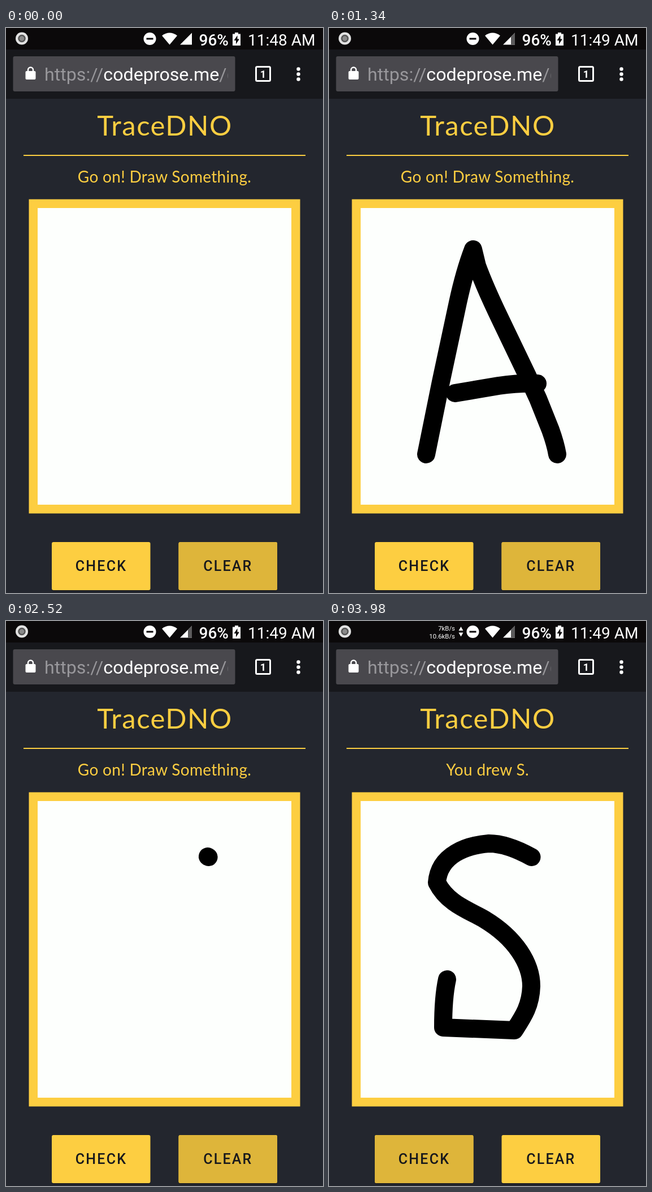
An HTML page for the animation above (4.22 s loop, 561 by 998 pixels).

```html
<!DOCTYPE html>
<html lang="en">
<head>
<meta charset="utf-8">
<title>Letter drawing demo</title>
<style>
  html, body { margin: 0; width: 100%; height: 100%; overflow: hidden; background: #23262e; }
  svg { display: block; width: 561px; height: 998px; font-family: Roboto, sans-serif; }
  .page { font-family: Lato, sans-serif; fill: #fdce41; text-anchor: middle; }
  .label { font-size: 25px; font-weight: 500; letter-spacing: 2.2px; fill: #17181c; text-anchor: middle; }
  .ink { fill: none; stroke: #000; stroke-width: 32; stroke-linecap: round; stroke-linejoin: round; stroke-dasharray: 1 2; }
  .dim { fill: #deb53a; }
</style>
</head>
<body>
<svg viewBox="0 0 561 998">
  <defs>
    <clipPath id="urlClip"><rect x="60" y="50" width="333" height="62"/></clipPath>
  </defs>

  <rect width="561" height="998" fill="#23262e"/>
  <rect width="561" height="125" fill="#17181c"/>
  <rect width="561" height="38" fill="#0b090a"/>

  <!-- Status bar -->
  <circle cx="28" cy="18.500" r="11" fill="#e2e2e2"/>
  <circle cx="28" cy="18.500" r="5.500" fill="#8a8a8a" stroke="#555" stroke-width="2.500"/>
  <g id="net" fill="#fff">
    <g font-size="11.400" text-anchor="end">
      <text id="up" x="223" y="17"/>
      <text id="down" x="223" y="31"/>
    </g>
    <path d="M229.500 17l4-7 4 7zM229.500 20.500h8l-4 7z"/>
  </g>
  <g fill="#fff">
    <circle cx="254.500" cy="19" r="11"/>
    <rect x="248.500" y="17.500" width="12" height="3" fill="#0b090a"/>
    <path d="M276 13.500Q289.500 3.500 303 13.500L289.500 29.500z"/>
    <path d="M308 29.500L329 8.500V29.500z"/>
    <path id="weak" d="M322 15.500L329 8.500V29.500H322z" fill="#5c5b5c"/>
    <path d="M401 10.500h4v-2.500h6v2.500h4v20.500h-14z"/>
    <path d="M409.500 13l-6 9h3.500v6.500l6-9h-3.500z" fill="#0b090a"/>
    <text x="341.500" y="31" font-size="28" font-weight="500">96%</text>
    <text id="clock" x="547.500" y="31" font-size="28" text-anchor="end"/>
  </g>

  <!-- Address bar -->
  <rect x="12.500" y="50" width="393" height="62" rx="3" fill="#49484d"/>
  <rect x="34.500" y="76" width="18" height="15" rx="2" fill="#fff"/>
  <path d="M39 77v-3a4.500 4.500 0 0 1 9 0v3" fill="none" stroke="#fff" stroke-width="2.500"/>
  <text x="68" y="92.500" font-size="32.200" fill="#98979b" clip-path="url(#urlClip)">https://<tspan fill="#fff">codeprose.me</tspan>/<tspan fill="#68676c">c</tspan></text>
  <rect x="442.500" y="68.500" width="25" height="25" rx="2" fill="none" stroke="#fff" stroke-width="3"/>
  <text x="455" y="87.500" font-size="18" font-weight="700" fill="#fff" text-anchor="middle">1</text>
  <path d="M517.500 72.500v0M517.500 81.500v0M517.500 90.500v0" stroke="#fff" stroke-width="6.500" stroke-linecap="round"/>

  <!-- Page -->
  <g class="page">
    <text x="281" y="190" font-size="49" letter-spacing="1.500">TraceDNO</text>
    <rect x="31" y="224" width="499" height="2"/>
    <text id="message" x="280.500" y="273" font-size="28" letter-spacing=".3"/>
    <rect x="40.500" y="302.500" width="480" height="555"/>
  </g>
  <rect x="56" y="318" width="449" height="524" fill="#fdfffd"/>
  <path class="ink" id="legs" pathLength="1" d="M172 753L198 625L228 485Q240 430 255 391L262 420Q276 458 302 512L351 614L370 655L392 710Q401 735 404 753"/>
  <path class="ink" id="bar" pathLength="1" d="M223 645L300 632Q335 627 369 628"/>
  <path class="ink" id="ess" pathLength="1" d="M358.500 417Q315 393 283 393C245 396 195 412 191 462C210 500 250 512 275 527C330 560 358 605 358 645C357 680 343 700 328 723L202 718Q202 665 209 633"/>

  <!-- Buttons -->
  <g fill="#1b1d24">
    <rect x="81" y="910" width="174.500" height="85" rx="3"/>
    <rect x="305.500" y="910" width="174.500" height="85" rx="3"/>
  </g>
  <g fill="#fdce41">
    <rect x="81" y="908" width="174.500" height="85" rx="3"/>
    <rect x="305.500" y="908" width="174.500" height="85" rx="3"/>
  </g>
  <rect class="dim" id="checkDim" x="81" y="908" width="174.500" height="85" rx="3"/>
  <rect class="dim" id="clearDim" x="305.500" y="908" width="174.500" height="85" rx="3"/>
  <text class="label" x="168.500" y="959">CHECK</text>
  <text class="label" x="392.800" y="959">CLEAR</text>
</svg>
<script>
const LOOP = 4220, CHECK_A = 1340, CLEAR = 1980, CHECK_S = 3200, FADE = 260;
const PROMPT = 'Go on! Draw Something.';
const $ = id => document.getElementById(id);
const progress = (t, from, to) => Math.min(1, Math.max(0, (t - from) / (to - from)));
const show = (el, on) => el.style.display = on ? '' : 'none';
const smooth = u => u * u * (3 - 2 * u);
const fade = (t, from) => smooth(progress(t, from, from + FADE));
const setText = (id, text) => { if ($(id).textContent !== text) $(id).textContent = text; };

// Network speeds: [from, to, up, down]
const speeds = [
  [440, 900, '2.6kB/s', '11.5kB/s'],
  [1680, 2420, '1.1kB/s', '3.2kB/s'],
  [3980, LOOP, '7kB/s', '10.6kB/s'],
];

function drawInk(id, t, from, to, until, power = 1) {
  const el = $(id);
  show(el, t >= from && t < until);
  const p = 1 - (1 - progress(t, from, to)) ** power;
  el.style.strokeDashoffset = 1 - Math.max(0.0002, p);
}

function render(t) {
  setText('clock', t < 40 ? '11:48 AM' : '11:49 AM');
  show($('weak'), t >= 40);

  const speed = speeds.find(([from, to]) => t >= from && t < to);
  show($('net'), speed);
  if (speed) { setText('up', speed[2]); setText('down', speed[3]); }

  setText('message', t >= 1760 && t < CLEAR ? 'You drew A.' : t >= 3720 ? 'You drew S.' : PROMPT);

  drawInk('legs', t, 420, 860, CLEAR, 1.45);
  drawInk('bar', t, 1000, 1140, CLEAR);
  drawInk('ess', t, 2520, 2960, LOOP);

  const checkFocus = fade(t, CHECK_A) - fade(t, CLEAR) + fade(t, CHECK_S);
  $('checkDim').style.opacity = checkFocus;
  $('clearDim').style.opacity = 1 - checkFocus;
}

function tick() {
  render(performance.now() % LOOP);
  requestAnimationFrame(tick);
}
tick();
</script>
</body>
</html>
```
